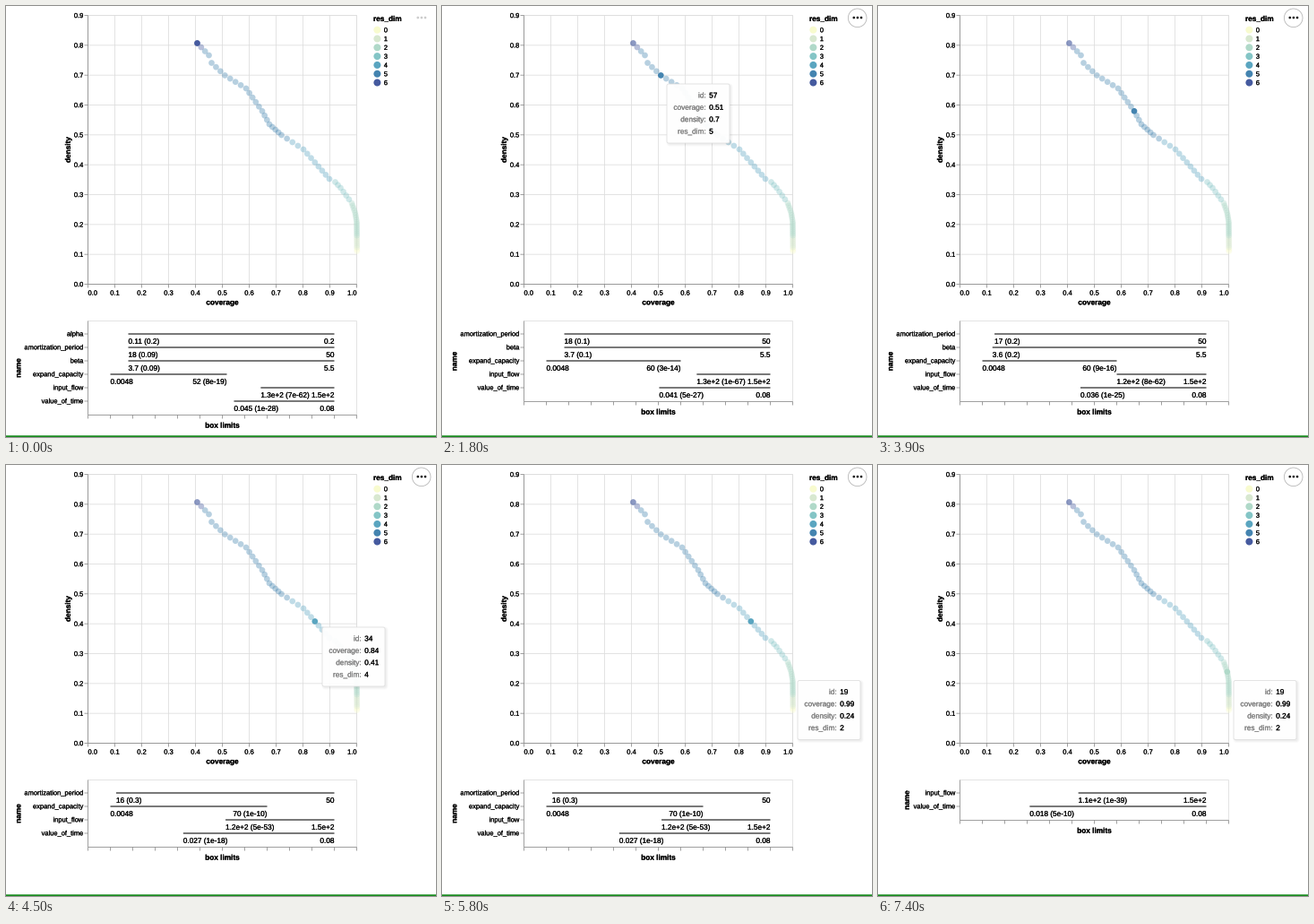
Recreate the animation shown at these times as a matplotlib script. Size 480 by 481 pixels, loop 7600 ms.

```python
import matplotlib.pyplot as plt
import numpy as np
from matplotlib.animation import FuncAnimation
from matplotlib.colors import to_rgba
from matplotlib.patches import Circle, FancyBboxPatch, Rectangle
from matplotlib.patheffects import withStroke

W, H, DPI = 480, 481, 64
STEP, LOOP = 100, 7600
PT = 72 / DPI  # points per pixel

plt.rcParams["font.family"] = "Liberation Sans"
plt.rcParams["text.hinting"] = "none"
plt.rcParams["toolbar"] = "None"

SMALL, MEDIUM = 7.5, 8.25
LEFT, RIGHT, TOP, BOTTOM = 91.5, 391.5, 10.5, 310.5
MIDDLE = (LEFT + RIGHT) / 2
BOX_TOP, ROW = 351.5, 15
GRID, AXIS = "#dddddd", "#888888"

DIM_COLORS = ["#f8fbcf", "#d8e8d0", "#b0d9c9", "#84c5c6",
              "#5aa5c0", "#4484b0", "#455a9f"]
DIM_STARTS = (2, 8, 24, 30, 40, 63)  # first id with one more dimension

# Trade-off curve: id, x, y at its bends, evenly filled in between
BENDS = np.array([
    (0, 391.8, 273.5), (15, 391.5, 241), (19, 389.8, 230.8), (23, 386, 220),
    (27, 373.5, 203), (29, 367.5, 196.5), (30, 361, 193), (34, 344.8, 174.5),
    (37, 332, 160), (41, 307.5, 144), (45, 294, 132), (48, 286, 117.3),
    (53, 268, 92), (57, 244.3, 77.4), (60, 229.5, 63.5), (61, 226.5, 55),
    (64, 213.5, 41.5), (65, 213.3, 41.5)]).T
IDS = np.arange(66)
XS, YS = (np.interp(IDS, BENDS[0], axis) for axis in BENDS[1:])
DIMS = np.searchsorted(DIM_STARTS, IDS, side="right")

# Full range of each input; a box narrows one end to a value with a p-value
RANGES = {"alpha": (0.1, 0.2), "amortization_period": (15, 50),
          "beta": (3.5, 5.5), "expand_capacity": (0.0048, 100),
          "input_flow": (80, 150), "value_of_time": (0.001, 0.08)}
CUT_ABOVE = "expand_capacity"
BOXES = {
    64: dict(alpha=(0.108, 0.2), amortization_period=(17.8, 0.09),
             beta=(3.66, 0.09), expand_capacity=(52, 8e-19),
             input_flow=(127, 7e-62), value_of_time=(0.0446, 1e-28)),
    57: dict(amortization_period=(17.8, 0.1), beta=(3.66, 0.1),
             expand_capacity=(60, 3e-14), input_flow=(127, 1e-67),
             value_of_time=(0.0408, 5e-27)),
    48: dict(amortization_period=(16.9, 0.2), beta=(3.59, 0.2),
             expand_capacity=(60, 9e-16), input_flow=(122, 8e-62),
             value_of_time=(0.0356, 1e-25)),
    34: dict(amortization_period=(15.9, 0.3), expand_capacity=(70, 1e-10),
             input_flow=(116, 5e-53), value_of_time=(0.0267, 1e-18)),
    19: dict(input_flow=(110, 1e-39), value_of_time=(0.0177, 5e-10)),
}

# Clicks: time, id.  Hovers: start, end, id, pointer position
CLICKS = [(0, 64), (1200, 57), (2500, 48), (4300, 34), (7000, 19)]
HOVERS = [(900, 1900, 57, 241, 77), (2300, 3300, 48, 285, 116.5),
          (4000, 5200, 34, 343, 171), (5500, 5700, 27, 373, 202),
          (5800, LOOP, 19, 387, 230.5)]
ENTER = HOVERS[0][0]

fig = plt.figure(figsize=(W / DPI, H / DPI), dpi=DPI, facecolor="white")
ax = fig.add_axes([0, 0, 1, 1])
ax.set_xlim(0, W)
ax.set_ylim(H, 0)
ax.axis("off")


def line(x0, y0, x1, y1, color, width=0.8, z=1):
    return ax.plot([x0, x1], [y0, y1], color=color, lw=width * PT, zorder=z,
                   solid_capstyle="butt", snap=False)[0]


def label(x, y, s, size, color="black", bold=False, z=4, **style):
    # A path effect draws glyphs as outlines, placed between whole pixels
    return ax.text(x, y, s, fontsize=size * PT, color=color, zorder=z,
                   va="baseline", weight="bold" if bold else "normal",
                   path_effects=[withStroke(linewidth=0.2, foreground=color)],
                   **style)


def text(x, y, s, size=SMALL, ha="left", color="black", bold=False, z=4):
    """Text whose digits are centred vertically on y."""
    return label(x, y + 0.35 * size, s, size, color, bold, z, ha=ha)


def side_title(x, y, s):
    return label(x + 0.35 * MEDIUM, y, s, MEDIUM, bold=True, ha="center",
                 rotation=90, rotation_mode="anchor")


def dot(x, y, r, color, z=4, **style):
    return ax.add_patch(Circle((x, y), r, fc=color, zorder=z,
                               **{"lw": 0, **style}))


def frame_lines(bottom):
    """Light top and right edges, darker axis lines left and below."""
    return [line(LEFT, y0, RIGHT, y0, color, z=z) for y0, color, z in
            ((bottom[0], GRID, 1), (bottom[1], AXIS, 2))] + [
            line(x, bottom[0], x, bottom[1], color, z=z) for x, color, z in
            ((RIGHT, GRID, 1), (LEFT, AXIS, 2))]


def draw_scatter_axes():
    frame_lines((TOP, BOTTOM))
    for k in range(11):
        x = LEFT + 30 * k
        line(x, TOP, x, BOTTOM, GRID)
        line(x, BOTTOM, x, BOTTOM + 4, AXIS, z=2)
        ha = {0: "left", 10: "right"}.get(k, "center")
        text(x, 320, f"{k / 10:.1f}", ha=ha)
    for k in range(10):
        y = BOTTOM - 100 / 3 * k
        line(LEFT, y, RIGHT, y, GRID)
        line(LEFT - 4, y, LEFT, y, AXIS, z=2)
        text(86.3, y, f"{k / 10:.1f}", ha="right")
    text(MIDDLE, 330.5, "coverage", MEDIUM, "center", bold=True)
    side_title(69, (TOP + BOTTOM) / 2, "density")


def draw_legend():
    text(410, 14, "res_dim", MEDIUM, bold=True)
    for k, color in enumerate(DIM_COLORS):
        y = 26.7 + 9.8 * k
        dot(414.4, y, 4, color)
        text(421.8, y, str(k))


def short(value):
    return f"{value:.2g}".replace("e+0", "e+")


def draw_rule(y, name, value, p):
    low, high = RANGES[name]
    note = f"{short(value)} ({p:.1g})"
    if name == CUT_ABOVE:
        ends, notes = (low, value), (short(low), note)
    else:
        ends, notes = (value, high), (note, short(high))
    x0, x1 = (LEFT + 25 + 250 * (v - low) / (high - low) for v in ends)
    return [line(x0, y, x1, y, "#222222", 1.2, 3),
            text(x0, y + 8, notes[0], MEDIUM),
            text(x1, y + 8, notes[1], MEDIUM, "right")]


def draw_limits(box):
    bottom = BOX_TOP + ROW * (len(box) + 1)
    parts = frame_lines((BOX_TOP, bottom))
    for k in range(13):
        x = LEFT + 25 * k
        parts.append(line(x, bottom, x, bottom + 4, AXIS, z=2))
    for k, (name, (value, p)) in enumerate(box.items(), 1):
        y = BOX_TOP + ROW * k - 0.5
        parts += [line(LEFT - 4, y, LEFT, y, AXIS, z=2),
                  text(86.3, y - 0.3, name, ha="right"),
                  *draw_rule(y, name, value, p)]
    title_x = 13.5 if "amortization_period" in box else 32
    parts += [side_title(title_x, (BOX_TOP + bottom) / 2, "name"),
              text(MIDDLE, bottom + 11.3, "box limits", MEDIUM, "center",
                   bold=True)]
    return parts


def rounded(x, y, w, h, r, **style):
    shape = f"round,pad=0,rounding_size={r}"
    return ax.add_patch(FancyBboxPatch((x, y), w, h, boxstyle=shape, **style))


def draw_tooltip(i, pointer_x, pointer_y):
    x, y, w, h = pointer_x + 10, pointer_y + 10, 70, 66
    fields = {"id": i, "coverage": short((XS[i] - LEFT) / 300),
              "density": short((BOTTOM - YS[i]) * 0.003), "res_dim": DIMS[i]}
    parts = [rounded(x + 1.5 - g, y + 1.5 - g, w + 2 * g, h + 2 * g, 2 + g,
                     fc="black", alpha=0.025, lw=0, zorder=9)
             for g in (0, 1, 2)]
    parts.append(rounded(x, y, w, h, 2, fc=(1, 1, 1, 0.96), ec="#dedede",
                         lw=0.8 * PT, zorder=10))
    for k, (key, value) in enumerate(fields.items()):
        ty = y + 12.5 + 13.4 * k
        parts += [text(x + 43.7, ty, key + ":", MEDIUM, "right", "#808080",
                       z=11),
                  text(x + 47.2, ty, str(value), MEDIUM, z=11)]
    return parts


def draw_menu(active):
    parts = []
    if active:
        parts.append(dot(463.7, 13.3, 10.3, "white", ec="#b4b4b4",
                         lw=0.8 * PT))
    color = "#1a1a1a" if active else "#cccccc"
    parts += [dot(463.9 + 4.1 * k, 13, 1.35, color, z=5) for k in (-1, 0, 1)]
    return parts


def show(parts, visible):
    for part in parts:
        part.set_visible(visible)


draw_scatter_axes()
draw_legend()
ax.add_patch(Rectangle((0, 479.3), W, 1.7, fc="#168a1c", lw=0, zorder=1,
                       snap=False))
marks = ax.scatter(XS, YS, s=(6.7 * PT) ** 2, linewidths=0, zorder=3)
panels = {i: draw_limits(box) for i, box in BOXES.items()}
tooltips = [draw_tooltip(*hover[2:]) for hover in HOVERS]
menus = {active: draw_menu(active) for active in (False, True)}


def update(frame):
    t = frame * STEP
    chosen = [i for start, i in CLICKS if start <= t][-1]
    marks.set_facecolor([to_rgba(DIM_COLORS[dim], 1 if i == chosen else 0.38)
                         for i, dim in zip(IDS, DIMS)])
    for i, parts in panels.items():
        show(parts, i == chosen)
    for (start, end, *_), parts in zip(HOVERS, tooltips):
        show(parts, start <= t < end)
    for active, parts in menus.items():
        show(parts, active == (t >= ENTER))
    return []


anim = FuncAnimation(fig, update, frames=LOOP // STEP, interval=STEP,
                     init_func=lambda: update(0), repeat=True,
                     repeat_delay=0, blit=False)
plt.show()
```
